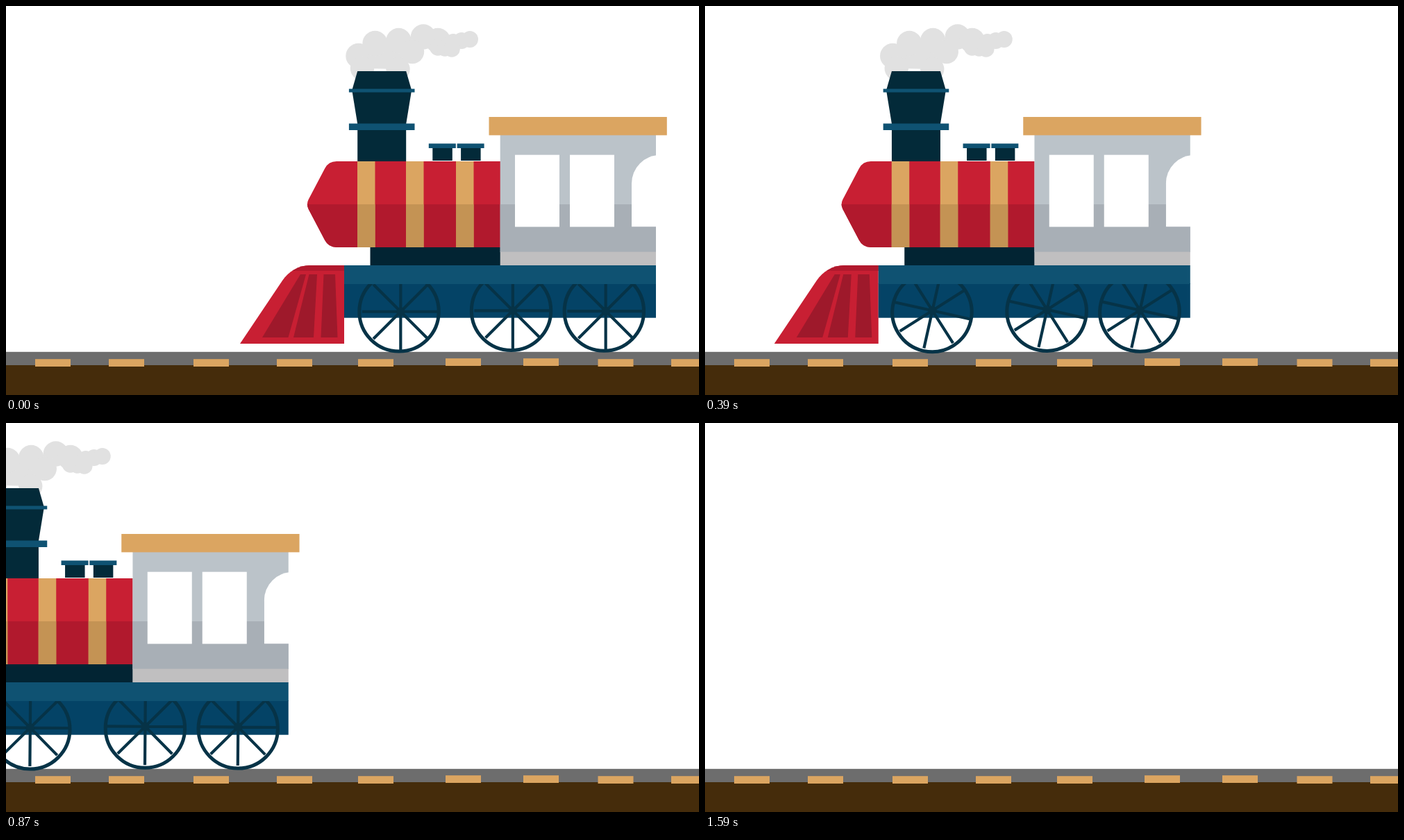
An HTML page with a canvas that plays this animation: 998x561 px, repeating every 1620 ms.

```html
<!DOCTYPE html>
<html lang="en">
<head>
<meta charset="utf-8">
<title>Steam train</title>
<style>
  html, body { margin: 0; width: 100%; height: 100%; overflow: hidden; background: #fff; }
  canvas { display: block; }
</style>
</head>
<body>
<canvas id="stage" width="998" height="561"></canvas>
<script>
const ctx = document.getElementById('stage').getContext('2d');
const LOOP = 1620, STEP = 30;
const SPEED = 18.25;                      // pixels per step
const SPIN = 21.74 * Math.PI / 180;       // clockwise turn per step
const MID = 286;                          // where the lower half falls into shade

const C = {
  navy: '#032a39', deep: '#022433', teal: '#0f5272', blue: '#044366', wheel: '#063347',
  red: '#c81f33', darkRed: '#b1192d', bar: '#9e192b',
  gold: '#dba561', darkGold: '#c49354',
  wall: '#bbc3c9', lowWall: '#a8afb6', sill: '#c0bfc0',
  smoke: '#e1e1e1', rail: '#6d6d6d', soil: '#452c0b'
};

function box(color, left, top, right, bottom) {
  ctx.fillStyle = color;
  ctx.fillRect(left, top, right - left, bottom - top);
}

function shadedBox(light, dark, left, top, right, bottom) {
  box(light, left, top, right, bottom);
  box(dark, left, MID, right, bottom);
}

function poly(color, points) {
  ctx.fillStyle = color;
  ctx.beginPath();
  points.forEach(([x, y]) => ctx.lineTo(x, y));
  ctx.fill();
}

function disc(x, y, r) {
  ctx.beginPath();
  ctx.arc(x, y, r, 0, Math.PI * 2);
  ctx.fill();
}

function clipped(tracePath, paint) {
  ctx.save();
  ctx.beginPath();
  tracePath();
  ctx.clip();
  paint();
  ctx.restore();
}

function drawTrack() {
  box(C.rail, 0, 498.8, 998, 518);
  box(C.soil, 0, 518, 998, 561);
  for (const x of [42, 148, 270, 390, 507, 633, 745, 852.5, 958]) {
    const y = x > 600 && x < 800 ? 508.2 : 509.2;
    box(C.gold, x, y, x + 51, y + 10.8);
  }
}

function drawSmoke() {
  const crest = [[507.5, 72], [531.5, 54], [565.5, 50], [601, 44.5], [622, 50]];
  const base = [[585, 66], [564.5, 91], [513, 90]];
  poly(C.smoke, [...crest, ...base]);
  crest.forEach(([x, y]) => disc(x, y, 18.2));
  base.forEach(([x, y]) => disc(x, y, 17.2));
  for (let i = 0; i < 3; i++) {
    disc(622 + 10 * i, 60 + i, 11.8);
    disc(644 + 12 * i, 52 - 2 * i, 12);
  }
}

// Symmetric slice of the chimney, from half-width a at the top to b below.
function slice(color, top, a, bottom, b) {
  const x = 541.2;
  poly(color, [[x - a, top], [x + a, top], [x + b, bottom], [x - b, bottom]]);
}

function drawChimneys() {
  slice(C.navy, 94, 35, 120, 42.5);
  slice(C.navy, 124, 42.5, 170, 35);
  slice(C.navy, 170, 35, 224, 35);
  slice(C.teal, 119.5, 47.3, 124.5, 47.3);
  slice(C.teal, 169.5, 47.3, 179, 47.3);
  for (const x of [608.8, 649.6]) {
    box(C.teal, x, 198.4, x + 39, 205);
    box(C.navy, x + 5.5, 205, x + 34, 223);
  }
}

function drawBoiler() {
  const corner = 464.5, tip = 432;
  clipped(() => {
    ctx.moveTo(712, 224);
    ctx.arcTo(corner, 224, tip, MID, 19);
    ctx.arcTo(tip, MID, corner, 348, 15);
    ctx.arcTo(corner, 348, 712, 348, 19);
    ctx.lineTo(712, 348);
  }, () => shadedBox(C.red, C.darkRed, 430, 224, 712, 348));
  for (const x of [506, 576, 648]) shadedBox(C.gold, C.darkGold, x, 224, x + 25.5, 348);
  box(C.deep, 524.5, 348, 712, 375);
}

function drawCabin() {
  shadedBox(C.wall, C.lowWall, 711.7, 186, 936, 355);
  box(C.sill, 711.7, 354.6, 936, 375);
  for (const x of [733, 812]) box('#fff', x, 214.7, x + 64, 318.5);
  clipped(() => ctx.rect(901, 214.7, 36, 103.8), () => {
    disc(942, 256, 41);
    box('#fff', 901, 256, 937, 318.5);
  });
  box(C.gold, 695.5, 160, 951.8, 186.4);
}

function drawCatcher() {
  clipped(() => {
    ctx.moveTo(487, 374);
    ctx.lineTo(438, 374);
    ctx.bezierCurveTo(421, 374, 407, 383, 398, 396);
    ctx.lineTo(337, 487);
    ctx.lineTo(487, 487);
  }, () => {
    box(C.red, 337, 374, 488, 487);
    box(C.darkRed, 337, 374, 488, 382);
  });
  const bar = (topL, topR, lowL, lowR) =>
    poly(C.bar, [[topL, 387], [topR, 387], [lowR, 478], [lowL, 478]]);
  bar(424, 432, 369, 406.5);
  bar(436.5, 448, 414, 443);
  bar(457.5, 474, 453.5, 477.5);
}

// Each wheel turns about a point slightly off its rim centre, so it wobbles.
function drawWheel(x, y, phase, angle) {
  const wobble = 1.6, hub = 2.3;
  ctx.save();
  ctx.translate(x, y);
  ctx.rotate(angle);
  ctx.translate(wobble * Math.cos(phase), wobble * Math.sin(phase));
  ctx.strokeStyle = ctx.fillStyle = C.wheel;
  ctx.lineWidth = 5;
  ctx.beginPath();
  ctx.arc(0, 0, 57.2, 0, Math.PI * 2);
  ctx.stroke();
  ctx.lineWidth = 4.2;
  ctx.beginPath();
  for (let i = 0; i < 8; i++) {
    const a = i * Math.PI / 4;
    ctx.moveTo(hub, 0);
    ctx.lineTo(hub + 55.5 * Math.cos(a), 55.5 * Math.sin(a));
  }
  ctx.stroke();
  disc(hub, 0, 6);
  ctx.restore();
}

function drawTrain(step) {
  const angle = step * SPIN;
  ctx.save();
  ctx.translate(-step * SPEED, 0);
  drawSmoke();
  drawChimneys();
  drawBoiler();
  drawCabin();
  drawCatcher();
  box(C.blue, 487, 400, 936, 449.7);
  drawWheel(565.6, 442.3, -1.3, angle);
  drawWheel(729, 438.6, 2.7, angle);
  drawWheel(862.8, 439.4, 2.7, angle);
  box(C.teal, 487, 374, 936, 401);
  ctx.restore();
}

function frame(now) {
  box('#fff', 0, 0, 998, 561);
  drawTrack();
  drawTrain(Math.floor((now % LOOP) / STEP));
  requestAnimationFrame(frame);
}
requestAnimationFrame(frame);
</script>
</body>
</html>
```
